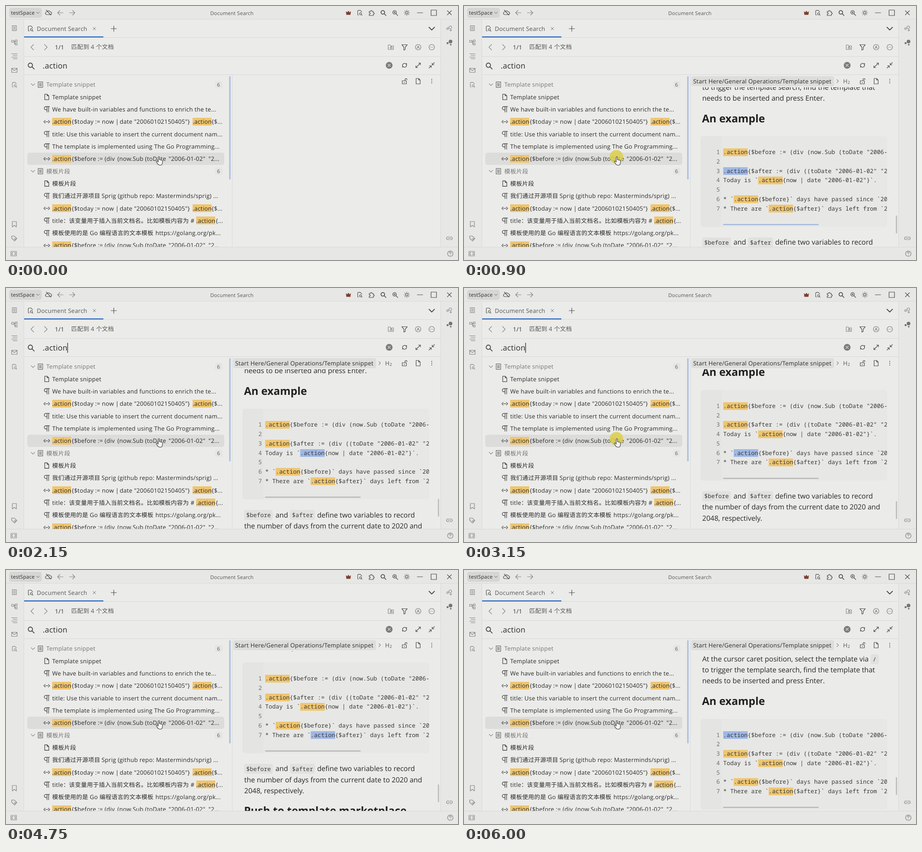
Recreate the animation shown at these times as an HTML page. Size 998 by 561 pixels, loop 6050 ms.

```html
<!DOCTYPE html>
<html lang="en">
<head>
<meta charset="utf-8">
<title>Document Search</title>
<style>
  html, body { margin: 0; width: 100%; height: 100%; overflow: hidden; background: #ebebe9; }
  svg { display: block; width: 100vw; height: 100vh; }
  text {
    font: 13px "Open Sans", "Noto Sans CJK SC", "Noto Sans CJK", sans-serif;
    letter-spacing: .24px; white-space: pre; fill: #2b2b2b;
    text-rendering: geometricPrecision;
  }
  .small { font-size: 11.2px; letter-spacing: .2px; }
  .input { font-size: 17px; }
  .dim { fill: #777; }
  .mid { fill: #555; }
  .body { font-size: 15.55px; letter-spacing: 0; fill: #262626; }
  .heading { font-size: 23.7px; font-weight: 700; letter-spacing: 0; fill: #202020; }
  .mono { font: 12.87px "Noto Sans Mono", monospace; letter-spacing: 0; fill: #3a3a3a; }
  .num { text-anchor: end; fill: #707070; }
</style>
</head>
<body>
<svg id="stage" viewBox="0 0 998 561"></svg>
<script>
const LOOP = 6050, CLICK_LENGTH = 300;
const LINE = 20.75, CODE_X = 572.3, CODE_Y = 364, CHAR = 7.722;
const INK = '#4a4a4a', SOFT = '#858585', MARK = '#efc56f', PICK = '#9fb8e6';
const HIT = '.action';

const icons = {
  file: 'M-4.5-6h5.500l3.500 3.500v8.500h-9zM1-6v3.500h3.500',
  page: 'M-5-6h10v12h-10zM-2.500-2.500h5M-2.500 0h5M-2.500 2.500h5',
  docFind: 'M5-2l-3.500-4h-4.500q-2 0-2 2v7.500q0 2 2 2M2 0a2.500 2.500 0 1 0 .01 0M4 4.500l2 1.500',
  para: 'M6-6h-8a3.500 3.500 0 0 0 0 7h2.500M.5-6v12M4-6v12',
  code: 'M-3.500-3l-3 3 3 3M3.500-3l3 3-3 3M-3 0h1.500M-.5 0h1M1.500 0h1.500',
  down: 'M-4-2l4 4 4-4', left: 'M3-6l-6 6 6 6', right: 'M-3-6l6 6-6 6',
  arrowL: 'M6 0h-12l5-5M-6 0l5 5', arrowR: 'M-6 0h12l-5-5M6 0l-5 5',
  cloud: 'M-4 4h7.500a3 3 0 0 0 .5-6 4.500 4.500 0 0 0-8 0 3 3 0 0 0 0 6zM-5-6l10 11',
  puzzle: 'M-5-3h3c-1-3 4-3 3 0h3v3c3-1 3 4 0 3v3h-9v-3c3 1 3-4 0-3z',
  find: 'M-1-5a4 4 0 1 0 .01 0M2 2l4 4',
  zoom: 'M-1-5a4 4 0 1 0 .01 0M2 2l4 4M-3-1h4M-1-3v4',
  sun: 'M0-2.800a2.800 2.800 0 1 0 .01 0M0-6v1M0 5v1M-6 0h1M5 0h1M-4.200-4.200l.7.7M3.500 3.500l.7.7M-4.200 4.200l.7-.7M3.500-3.500l.7-.7',
  minus: 'M-6 0h12', square: 'M-6-6h12v12h-12z', cross: 'M-4.500-4.500l9 9M4.500-4.500l-9 9', plus: 'M-6 0h12M0-6v12',
  tree: 'M-6-4h5v4h-5zM2-5h4v4h-4zM2 2h4v4h-4zM-1-2h3M.5-2v6h1.500',
  lines: 'M-6-5.500h12M-3-2h9M-6 2h12M-3 5.500h9',
  mail: 'M-6-4.500h12v9h-12zM-6-4l6 4.500 6-4.500',
  bookmark: 'M-4.500-6h9v12l-4.500-3.500-4.500 3.500z',
  tag: 'M-6-5h5.500l6 5.500-5 5.500-6.500-6zM-3.500-2.500h.01M-.5 1l1.500 1.500 2-2',
  screen: 'M-6-5h12v10h-12zM-3.500-.5v-2h2M1.500-2.500h2v2M3.500.5v2h-2M-1.500 2.500h-2v-2',
  graph: 'M2-5a3 3 0 1 0 .01 0M-4-1a2 2 0 1 0 .01 0M3 3a1.500 1.500 0 1 0 .01 0',
  link: 'M-1-3h-2.500a3 3 0 0 0 0 6h2.500M1-3h2.500a3 3 0 0 1 0 6h-2.500M-3 0h6',
  help: 'M0-6a6 6 0 1 0 .01 0M-2-1.500c0-3 4-3 4-.5 0 1.500-2 1-2 2.500M0 3v.5',
  folder: 'M-6-5h4l1.500 2h6v8h-11.500zM-1.500 0h4v3h-4zM-.5 0v-1.500h2v1.500',
  filter: 'M-6-5.500h12l-4.500 5.500v5l-3 1.500v-6.500z',
  letter: 'M0-6a6 6 0 1 0 .01 0M-2.500 3l2.500-6 2.500 6M-1.500 1h3',
  more: 'M0-6a6 6 0 1 0 .01 0M-3 0h.8M-.4 0h.8M2.200 0h.8',
  refresh: 'M-4.500 1a4.500 4.500 0 0 1 7.500-4l1.500 1.500v-3M4.500-1a4.500 4.500 0 0 1-7.500 4l-1.500-1.500v3',
  expand: 'M-5 5l10-10M1-5h4v4M-5 1v4h4',
  collapse: 'M-6 6l5-5h-4M-1 1v4M6-6l-5 5h4M1-1v-4',
  unlock: 'M-5-1h9v7h-9zM1-1v-2.500a2.200 2.200 0 0 1 4.400 0M-.5 2v1.500',
  dots: 'M0-4v.01M0 0v.01M0 4v.01'
};

const text = (x, y, s, cls = '') => `<text x="${x}" y="${y}" class="${cls}">${s}</text>`;
const rect = (x, y, w, h, fill, r = 0) =>
  `<rect x="${x}" y="${y}" width="${w}" height="${h}" rx="${r}" fill="${fill}"/>`;
const icon = (name, x, y, color = SOFT, scale = 1, width = 1.2) =>
  `<path d="${icons[name]}" transform="translate(${x} ${y}) scale(${scale})" fill="none" stroke="${color}" stroke-width="${width}" stroke-linecap="round" stroke-linejoin="round"/>`;
const iconSet = (list, color) =>
  list.map(([name, x, y, scale, width]) => icon(name, x, y, color, scale, width)).join('');

const todayRow = ['code', [102, HIT], [145, '{$today := now | '], [251, 'date "20060102150405"}'], [412, HIT], [454, '{$...']];
const beforeRow = ['code', [102, HIT], [145, '{$before := (div '], [246, '(now.Sub (toDate '], [359, '"2006-01-02" '], [447, '"2...']];
const rows = [
  ['head', [89, 'Template snippet']],
  ['file', [102, 'Template snippet']],
  ['para', [102, 'We have built-in variables and functions to enrich the te...']],
  todayRow,
  ['para', [102, 'title: Use this variable to insert the current document nam...']],
  ['para', [102, 'The template is implemented using The Go Programming...']],
  beforeRow,
  ['head', [89, '模板片段']],
  ['file', [102, '模板片段']],
  ['para', [102, '我们通过开源项目'], [211, 'Sprig (github repo: Masterminds/sprig) ...']],
  todayRow,
  ['para', [102, 'title：'], [139, '该变量用于插入当前文档名。比如模板内容为 # '], [420, HIT], [463, '{...']],
  ['para', [102, '模板使用的是'], [185, 'Go 编程语言的文本模板'], [330, 'https://golang.org/pk...']],
  beforeRow
];

function listRow([kind, ...parts], i) {
  const y = 173.6 + i * 27.33, head = kind === 'head';
  const lead = head
    ? icon('down', 59.5, y, SOFT) + icon('page', 76, y, '#666') +
      rect(462, y - 8, 16, 16, '#e5e5e3', 3) + text(466, y + 4, 6, 'small mid')
    : icon(kind, 90, y, INK, 1, 1.3);
  return lead + parts.map(([x, s]) =>
    (s === HIT ? rect(x, Math.round(y - 9), 42, 17, MARK) : '') + text(x, y + 4.6, s, head ? 'dim' : '')).join('');
}

const codeLines = [
  '.action{$before := (div (now.Sub (toDate "2006-01-02"',
  '',
  '.action{$after := (div ((toDate "2006-01-02" "2006-',
  'Today is `.action{now | date "2006-01-02"}`.',
  '',
  '* `.action{$before}` days have passed since `2020-',
  '* There are `.action{$after}` days left from `2048-'
];

function codeLine(s, i) {
  const y = CODE_Y + i * LINE, at = s.indexOf(HIT);
  const mark = at < 0 ? '' :
    `<rect class="hit" data-line="${i + 1}" x="${CODE_X + at * CHAR}" y="${y - 8}" width="${HIT.length * CHAR}" height="17"/>`;
  return text(565, y + 4.7, i + 1, 'mono num') +
    `<g clip-path="url(#codeClip)">${mark}${text(CODE_X, y + 4.7, s, 'mono')}</g>`;
}

const chip = (x, y, s, w) => rect(x, y - 11, w, 22, '#e1e1df', 4) + text(x + 4.6, y + 4.7, s, 'mono');

const article =
  text(526, 201.600, 'At the cursor caret position, select the template via', 'body') + chip(898, 197, '/', 18) +
  text(526, 226, 'to trigger the template search, find the template that', 'body') +
  text(526, 250.300, 'needs to be inserted and press Enter.', 'body') +
  text(525.5, 298, 'An example', 'heading') +
  '<rect id="block" x="522" y="329" width="412.5" height="200" rx="6"/>' +
  '<path id="gutter" d="M568 329h-40q-6 0-6 6v188q0 6 6 6h40z"/>' +
  codeLines.map(codeLine).join('') +
  '<rect id="codeBar" x="572" y="523" width="211" height="2.4" rx="1"/>' +
  chip(526, 563.500, '$before', 63) + text(595, 568.800, 'and', 'body') +
  chip(627, 563.500, '$after', 55) + text(687, 568.800, 'define two variables to record', 'body') +
  text(526, 593, 'the number of days from the current date to 2020 and', 'body') +
  text(526, 617.300, '2048, respectively.', 'body') +
  text(525.5, 664, 'Push to template marketplace', 'heading');

const frame =
  rect(0, 0, 998, 561, '#e7e7e5') + rect(40, 30, 920, 502, '#ebebe9') +
  '<path d="M0 29.5h998M40 69.500h920M40 111.500h920M40 151.500h920M0 532.500h998M39.500 30v502M959.500 30v502M499.500 152v380" stroke="#d9d9d7" fill="none"/>' +
  rect(40, 67, 175, 2.6, '#3b74c4') +
  rect(7, 4, 72, 22, '#d6d6d4', 5) + text(11, 19, 'testSpace', 'small') + icon('down', 70.500, 15, INK, .75) +
  text(451, 19.500, 'Document Search', 'small mid') +
  text(68, 55, 'Document Search', 'mid') +
  text(108, 95.500, '1/1') + text(144, 95.300, '匹配到 4 个文档', 'mid') +
  '<path d="M750.500 11.500l3 2.500 2.500-3.500 2.500 3.500 3-2.500-1 8h-9z" fill="#7a4032"/>' +
  iconSet([['cloud', 94, 15], ['docFind', 781, 15, .9], ['puzzle', 807, 15], ['find', 833, 15, 1, 1.6],
    ['zoom', 859, 15], ['sun', 885, 15], ['minus', 914, 15], ['square', 944.500, 15], ['cross', 979, 15],
    ['docFind', 54, 50, .95], ['plus', 238, 50], ['cross', 195, 50, .65], ['down', 940, 50, 1.500],
    ['filter', 880, 91], ['find', 55, 132, 1.2, 1.5], ['refresh', 880, 131], ['expand', 910, 131],
    ['collapse', 940, 131], ['unlock', 880, 166], ['file', 910, 166], ['dots', 940, 166, 1, 2]], INK) +
  iconSet([['arrowL', 120, 15], ['arrowR', 146, 15], ['left', 58, 91], ['right', 88, 91],
    ['folder', 850, 91], ['letter', 910, 91], ['more', 940, 91],
    ['page', 18.500, 49, .9], ['tree', 18.500, 80], ['lines', 18.500, 111], ['mail', 18.500, 142],
    ['docFind', 18.500, 174, .9], ['bookmark', 18.500, 482], ['tag', 18.500, 513], ['screen', 17, 547],
    ['graph', 979, 49], ['link', 979, 513], ['help', 981, 547]], SOFT) +
  '<g fill="#73736f"><circle cx="981.500" cy="78.500" r="4"/><circle cx="975" cy="82" r="2.300"/><circle cx="982" cy="85.500" r="1.800"/></g>' +
  '<circle cx="846" cy="131" r="7.500" fill="#7b7b7b"/>' + icon('cross', 846, 131, '#ebebe9', .6, 2) +
  text(81, 137.700, HIT, 'input');

document.getElementById('stage').innerHTML = `
  <defs>
    <clipPath id="listClip"><rect x="40" y="152" width="460" height="380"/></clipPath>
    <clipPath id="paneClip"><rect x="500" y="179.500" width="459" height="352.500"/></clipPath>
    <clipPath id="codeClip"><rect x="522" y="329" width="411.800" height="200"/></clipPath>
  </defs>
  ${frame}
  <path id="caret" d="M136 121v22" stroke="#222" stroke-width="1.300"/>
  ${rect(47, 324, 435, 27, '#dcdcda', 5)}
  <g clip-path="url(#listClip)">${rows.map(listRow).join('')}</g>
  ${rect(492.7, 155, 3.3, 228, '#afc1de', 1.5)}
  <g id="doc">
    ${rect(502, 155, 315, 22, '#dddddb', 4)}
    ${text(506, 171, 'Start Here/General Operations/Template snippet')}
    ${icon('right', 825, 166, SOFT, .6, 1.8)}
    ${text(837, 171, 'H', 'mid')}<text x="847" y="172" class="mid" style="font-size:9px">2</text>
    <g clip-path="url(#paneClip)"><g id="article">${article}</g></g>
    <rect id="scrollbar" x="953.500" width="2.800" height="39.500" rx="1.400" fill="#bdbdbb"/>
  </g>
  <circle id="click" cx="336.500" cy="333" r="15" fill="#dccf4f" opacity=".88"/>
  <path d="M336 334.500c0-2.300 3-2.300 3 0v5l4.800 1c1.700.4 2.200 1.500 2 3l-.8 4.500c-.4 2.400-1.500 3.500-3.500 3.500h-2.500c-2 0-3-1-4-2.600l-3-4.400c-1-1.700.8-2.700 2-1.600l2 1.800z"
    fill="#f4f4f2" stroke="#333" stroke-width="1.100" stroke-linejoin="round"/>`;

const el = id => document.getElementById(id);
const hits = [...document.querySelectorAll('.hit')];
const clicks = [50, 750, 1450, 2900, 4050, 5400];
const picks = [[150, 1], [850, 3], [1550, 4], [2950, 6], [4150, 7], [5500, 1]];
const caretOn = [[50, 750], [1400, 1950], [2050, 2600], [2850, 3550], [4050, 4750], [5400, 5950]];
const show = (id, on) => el(id).setAttribute('visibility', on ? 'visible' : 'hidden');

function draw(t) {
  const index = picks.filter(([start]) => t >= start).length - 1;
  const line = index < 0 ? 1 : picks[index][1];
  const flash = index === 0, scroll = (line - 1) * LINE;

  show('doc', index >= 0);
  show('caret', caretOn.some(([from, to]) => t >= from && t < to));
  show('click', clicks.some(start => t >= start && t < start + CLICK_LENGTH));
  el('article').setAttribute('transform', `translate(0 ${-scroll})`);
  el('scrollbar').setAttribute('y', 457.5 + scroll * .128);
  el('block').setAttribute('fill', flash ? '#b8c8e8' : '#e7e7e5');
  el('gutter').setAttribute('fill', flash ? '#a3bbe5' : '#e4e4e2');
  el('codeBar').setAttribute('fill', flash ? '#93a3c1' : line === 3 ? '#a3b8dc' : '#b7b7b5');
  for (const hit of hits) {
    const picked = +hit.dataset.line === line;
    hit.setAttribute('fill', picked ? (flash ? '#85a4da' : PICK) : MARK);
  }
}

const begin = performance.now();
function tick() {
  draw((performance.now() - begin) % LOOP);
  requestAnimationFrame(tick);
}
tick();
</script>
</body>
</html>
```
